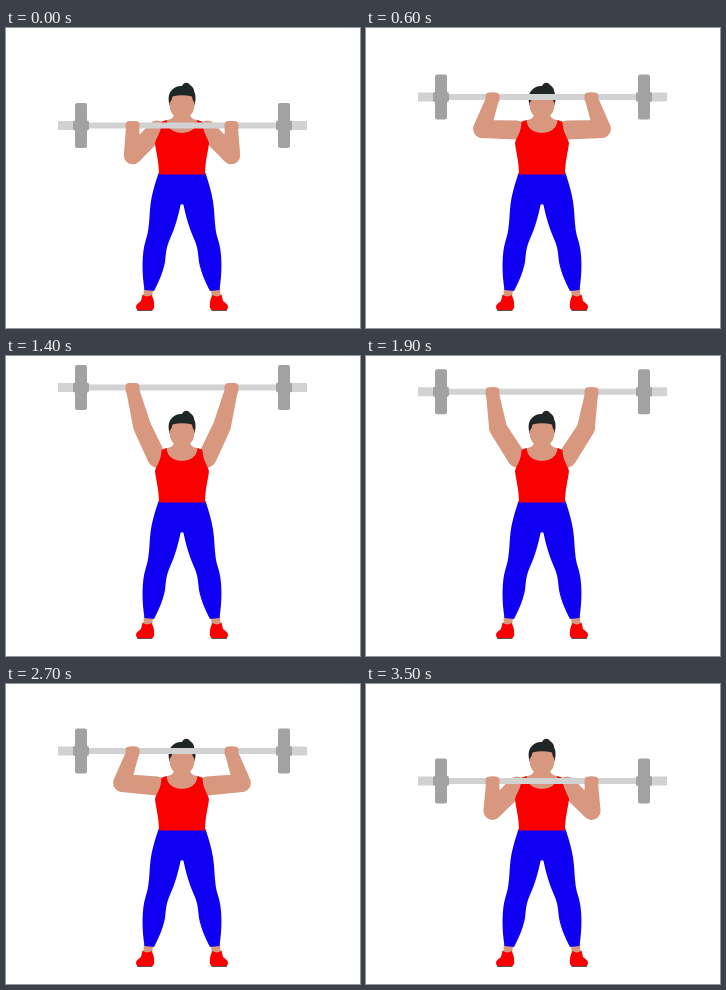
These frames come from a looping animation (354 px wide and 300 px high, 3600 ms). An HTML page:

```html
<!DOCTYPE html>
<html lang="en">
<meta charset="utf-8">
<title>Overhead press</title>
<style>
html, body { margin: 0; width: 100%; height: 100%; overflow: hidden; background: #fff; }
svg { display: block; width: 354px; height: 300px; }
.skin { fill: #d7987f; }
</style>
<svg viewBox="0 0 354 300">
  <g id="side">
    <path id="arm" class="skin"/>
    <path class="skin" d="M177 86H168Q168 91 161 92Q151 94 149 101L154 114H177Z"/>
    <path class="skin" d="M138 260H147L146 272H137Z"/>
    <path fill="#1000f3" d="M177 145H152.500C149 156 145 168 144 182C143 194 143 203 139.500 213C135.500 226 136 246 138.500 262L148 263C152 255 157 245 159 234C160 226 160 220 163.500 212C168 202 172 190 174.500 177Q175 176 177 176Z"/>
    <path fill="#fa0000" d="M177 105C167 105 161 100 160.500 92L155.500 94C155 105 151 108 149 115C150 125 153 133 153 146.500H177Z"/>
    <path fill="#fa0000" d="M136.500 266.500Q141 270 145.500 267Q149 273 148 280L146 282.500H132Q129 280 130.500 277Q132 275 135 273Z"/>
    <path stroke="#655055" d="M131 282.500H146.500"/>
  </g>
  <use href="#side" transform="matrix(-1 0 0 1 352 0)"/>
  <path fill="#202526" d="M163.500 77C161 67 164 62 170 59Q173 57.500 176 58C178 54 182 54 184 57C187 59 188 61 188 63C190 67 190 72 188.500 77Z"/>
  <path class="skin" d="M163.500 75Q166 73 166.500 68.500Q176 66 186 68.500Q186.500 73 188.500 75C188.500 83 186 88 180 89H172C166 88 163.500 83 163.500 75Z"/>
  <g id="bar">
    <path fill="#d2d2d2" d="M52-4.500H70V4.500H52ZM284-4.500H301V4.500H284ZM80-3H274V3H80Z"/>
    <g id="plate" fill="#a2a2a2">
      <rect x="67" y="-5" width="16" height="10" rx="2"/>
      <rect x="69" y="-22.500" width="12" height="45" rx="2"/>
    </g>
    <use href="#plate" x="203"/>
    <g class="skin">
      <rect x="119.500" y="-4.500" width="14" height="10.500" rx="4"/>
      <rect x="218.500" y="-4.500" width="14" height="10.500" rx="4"/>
    </g>
  </g>
</svg>
<script>
const LOOP = 3600, STEP = 100;
const arm = document.getElementById('arm'), bar = document.getElementById('bar');

// Time and height of the bar along one lift
const keys = [[0, 97.5], [300, 88], [900, 49], [1200, 34.5], [1500, 31.2],
  [1800, 33.5], [2300, 48.5], [2700, 67], [3000, 78.5], [3500, 97]];

function key(i) {
  const n = keys.length, [t, y] = keys[(i + n) % n];
  return [t + LOOP * Math.floor(i / n), y];
}

function slope(i) {
  const [a, p] = key(i - 1), [b, q] = key(i + 1);
  return (q - p) / (b - a);
}

function barHeight(t) {
  const i = keys.findLastIndex(k => k[0] <= t);
  const [a, p] = key(i), [b, q] = key(i + 1);
  const d = b - a, u = (t - a) / d, v = 1 - u;
  return v * v * ((1 + 2 * u) * p + u * d * slope(i))
    + u * u * ((3 - 2 * u) * q - v * d * slope(i + 1));
}

// Tapered limb with round ends
function limb(x1, y1, r1, x2, y2, r2) {
  const d = Math.hypot(x2 - x1, y2 - y1), nx = (y1 - y2) / d, ny = (x2 - x1) / d;
  return `M${x1 + nx * r1} ${y1 + ny * r1}A${r1} ${r1} 0 0 1 ${x1 - nx * r1} ${y1 - ny * r1}`
    + `L${x2 - nx * r2} ${y2 - ny * r2}A${r2} ${r2} 0 0 1 ${x2 + nx * r2} ${y2 + ny * r2}Z`;
}

// The upper arm turns in proportion to the height of the bar
function armPath(y) {
  const sx = 151, sy = 102, length = 35;
  const angle = (y - 70) * 1.68 * Math.PI / 180;
  const ex = sx - length * Math.cos(angle), ey = sy + length * Math.sin(angle);
  return limb(sx, sy, 9.5, ex, ey, 9) + limb(ex, ey, 9, 126.5, y + 2, 6.5);
}

function draw() {
  const t = Math.floor(performance.now() % LOOP / STEP) * STEP;
  const y = barHeight(t);
  bar.setAttribute('transform', `translate(0 ${y})`);
  arm.setAttribute('d', armPath(y));
  requestAnimationFrame(draw);
}
draw();
</script>
</html>
```
